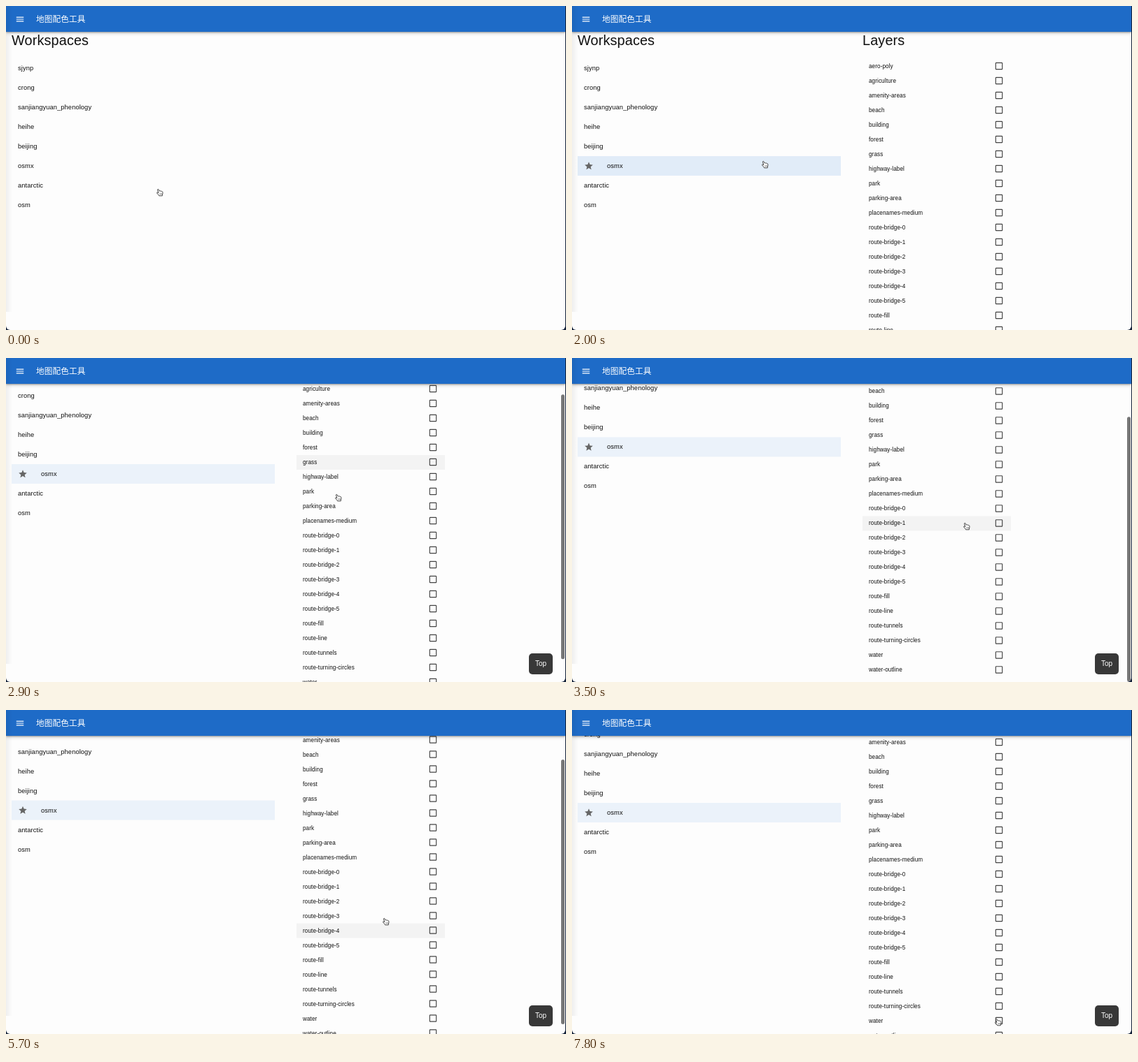
These frames come from a looping animation (800 by 464 pixels, 8000 ms). An HTML page:

```html
<!DOCTYPE html>
<html lang="zh">
<head>
<meta charset="utf-8">
<style>
html, body { margin: 0; width: 100%; height: 100%; overflow: hidden; background: #14223a; }
#stage { position: relative; width: 799px; height: 464px; overflow: hidden; background: #fdfdfd;
  border-radius: 0 0 6px 6px; color: #111; font-family: "Liberation Sans", Arial, sans-serif; white-space: nowrap; }
#stage *, #stage { box-sizing: border-box; }
#page, header, #shade, #thumb, #top, #cursor, section, h1, svg { position: absolute; }
#page { left: 0; top: 0; }
section { top: 0; }
h1 { margin: 0; top: 37px; font: 400 19.83px/24px "Liberation Sans", Arial, sans-serif; letter-spacing: .00735em; }
.row { position: relative; padding-left: 9px; }
#spaces { left: 8px; padding-top: 75px; font-size: 9.33px; letter-spacing: .00938em; }
#spaces .row { width: 376px; height: 28px; line-height: 28px; }
#spaces svg { display: none; left: 9px; top: 7px; fill: #666; }
#spaces .selected { padding-left: 42px; }
#spaces .selected svg { display: block; }
#layers { left: 415px; padding-top: 75.5px; font-size: 8.16px; letter-spacing: .01071em; }
#layers .row { width: 212px; height: 21px; line-height: 21px; }
#layers svg { left: 188.4px; top: 3.5px; fill: none; stroke: #444; stroke-width: 2; }
#shade { left: 0; top: 0; width: 9px; height: 438px; background: linear-gradient(90deg, rgba(0,0,0,.06), transparent); }
header { left: 0; top: 0; width: 100%; height: 37px; padding-left: 43px; background: #1e6bc7; color: #fff;
  font: 400 11.66px/36px "Noto Sans CJK SC", "Noto Sans CJK", sans-serif; letter-spacing: .0075em;
  box-shadow: 0 1px 2px rgba(0,0,0,.3), 0 2px 5px rgba(0,0,0,.18); }
header svg { left: 13px; top: 11.5px; fill: #fff; }
#thumb { left: 793px; top: 0; width: 5px; height: 379px; border-radius: 3px; background: #777; }
#top { left: 747px; top: 423px; width: 34px; height: 30px; border-radius: 5px; background: #383838; color: #fff;
  font-size: 10px; line-height: 29px; text-align: center; }
#cursor { left: -6px; top: -7px; }
</style>
</head>
<body>
<div id="stage">
  <div id="page">
    <section id="spaces"><h1>Workspaces</h1></section>
    <section id="layers"><h1>Layers</h1></section>
  </div>
  <header>
    <svg width="14" height="14" viewBox="0 0 24 24"><path d="M3 6h18v2H3zM3 11h18v2H3zM3 16h18v2H3z"/></svg>地图配色工具
  </header>
  <div id="shade"></div>
  <div id="top">Top</div>
  <div id="thumb"></div>
  <svg id="cursor" width="12" height="14" viewBox="-6 -7 12 14">
    <path d="M-3.6-4.1Q-2.8-5.3-1.9-4.1L-.8-2Q0-2.7.7-1.9 1.6-2.4 2.2-1.5 3.5-1.7 3.8-.5 4.3 1.7 3.4 3L3.3 4.8H-1.4L-2.4 3.1-4.4.9Q-4.6-.2-3.5-.1L-2.2.7Z"
      fill="#fff" stroke="#333" stroke-width=".9" stroke-linejoin="round"/>
    <path d="M-.2 1.4l.2 1.8M1.1 1.3v1.9M2.3 1.3v1.8" stroke="#444" stroke-width=".6"/>
  </svg>
</div>
<script>
const LOOP = 8000, STEP = 100, SELECT_AT = 1400, LOAD_AT = 1500;
const $ = id => document.getElementById(id);
const STAR = '<path d="M12 17.27L18.18 21l-1.64-7.03L22 9.24l-7.19-.61L12 2 9.19 8.63 2 9.24l5.46 4.73L5.82 21z"/>';
const BOX = '<rect x="4" y="4" width="16" height="16" rx="1"/>';

function addRows(id, names, icon) {
  return names.split(" ").map(name => {
    const row = document.createElement("div");
    row.className = "row";
    row.innerHTML = `<svg width="14" height="14" viewBox="0 0 24 24">${icon}</svg>${name}`;
    return $(id).appendChild(row);
  });
}
const spaces = addRows("spaces", "sjynp crong sanjiangyuan_phenology heihe beijing osmx antarctic osm", STAR);
const layers = addRows("layers", "aero-poly agriculture amenity-areas beach building forest grass highway-label park " +
  "parking-area placenames-medium " + [0, 1, 2, 3, 4, 5].map(i => "route-bridge-" + i).join(" ") +
  " route-fill route-line route-tunnels route-turning-circles water water-outline", BOX);

// [time, x, y]
const pointerKeys = [[0, 220, 267], [100, 220, 267], [600, 268, 230], [1400, 268, 230], [1900, 276, 227],
  [2200, 276, 227], [2400, 475, 200], [3200, 475, 200], [3500, 564, 241], [3700, 580, 262], [4000, 584, 275],
  [4400, 606, 404], [4600, 606, 420], [4800, 610, 441], [5000, 606, 300], [5150, 570, 241], [5300, 543, 303],
  [6200, 543, 303], [6600, 590, 380], [7000, 606, 404], [7300, 604, 456], [7500, 608, 440], [7700, 608, 440], [7800, 609, 447]];
// [time, offset]
const scrollKeys = [[2600, 0], [2700, 9], [2800, 34], [2900, 63], [3000, 84], [3100, 97], [3200, 101.6],
  [5300, 101.6], [5400, 99], [5500, 94], [5600, 89], [5700, 85.5], [5800, 83], [5900, 82]];

function sample(keys, t) {
  const next = keys.findIndex(k => k[0] > t);
  if (next < 0) return keys.at(-1).slice(1);
  if (next === 0) return keys[0].slice(1);
  const a = keys[next - 1], b = keys[next], p = (t - a[0]) / (b[0] - a[0]);
  return a.slice(1).map((v, i) => v + (b[i + 1] - v) * p);
}
const clamp = v => Math.max(0, Math.min(1, v));

// Hover only follows pointer moves, so it keeps its row while the page scrolls.
function hovered(t) {
  if (t < STEP) return null;
  const [x, y] = sample(pointerKeys, t);
  const held = t < 3200 ? 0 : t < 6200 ? 101.6 : 82;
  const pageY = y + 2 + held;
  if (x < 384) return spaces[Math.floor((pageY - 75) / 28)];
  if (x > 415 && x < 600) return layers[Math.floor((pageY - 75.5) / 21)];
  return null;
}

function render(t) {
  const [x, y] = sample(pointerKeys, t), [scroll] = sample(scrollKeys, t);
  const recent = [t, t - 50, t - 100].map(hovered);
  for (const row of [...spaces, ...layers]) {
    const hover = recent.filter(r => r === row).length / 3 * .04;
    const selected = row === spaces[5] && t >= SELECT_AT;
    row.classList.toggle("selected", selected);
    row.style.background = selected ? `rgba(25,118,210,${.08 + hover})` : `rgba(0,0,0,${hover})`;
  }
  $("layers").style.visibility = t >= LOAD_AT ? "visible" : "hidden";
  $("page").style.transform = `translateY(${-scroll}px)`;
  $("top").style.visibility = scroll > 20 ? "visible" : "hidden";
  $("thumb").style.transform = `translateY(${scroll * .83}px)`;
  $("thumb").style.opacity = t < 2700 ? 0 : t < 5400 ? clamp((4000 - t) / 300) : clamp((6600 - t) / 300);
  $("cursor").style.transform = `translate(${x}px,${y}px)`;
}

function frame() {
  render(Math.floor(performance.now() % LOOP / STEP) * STEP);
  requestAnimationFrame(frame);
}
frame();
</script>
</body>
</html>
```
